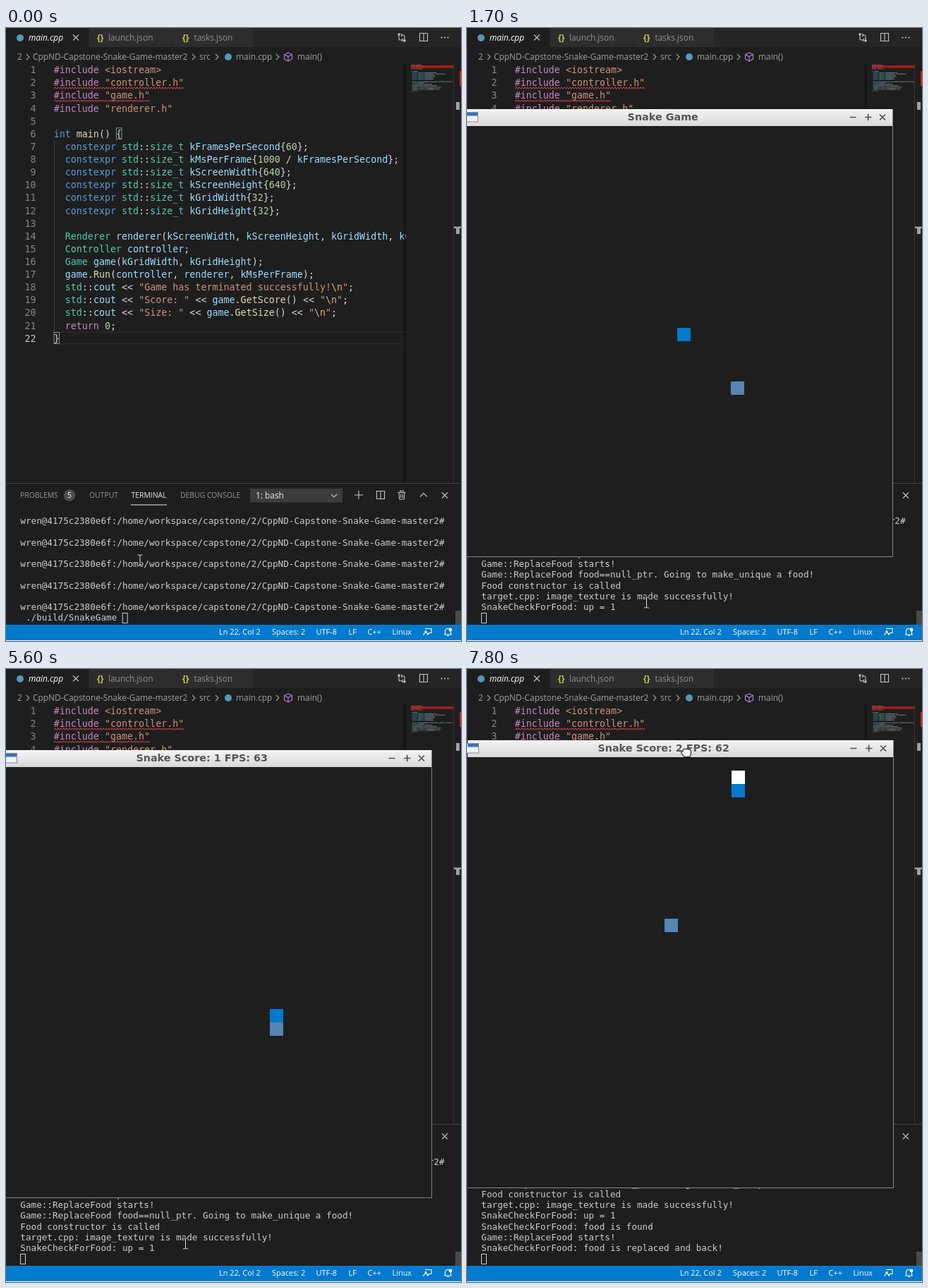
Animation, 645 px wide and 869 px high, one loop 8000 ms. Source, as an HTML page:

```html
<!DOCTYPE html>
<html lang="en">
<head>
<meta charset="utf-8">
<title>Snake in the editor</title>
<style>
  html, body { margin: 0; width: 100%; height: 100%; overflow: hidden; background: #1e1e1e; }
  svg { display: block; width: 645px; height: 869px; }
  text { white-space: pre; }
  .code { font: 13.33px "DejaVu Sans Mono", monospace; fill: #d4d4d4; }
  .term { font: 12.65px "DejaVu Sans Mono", monospace; fill: #cccccc; }
  .ui { font: 11.9px "Open Sans", "Noto Sans", sans-serif; fill: #a0a0a0; }
  .panel { font-size: 10.4px; fill: #979797; }
  .status { font-size: 10.95px; fill: #fff; }
  .title { font: bold 14.35px "DejaVu Sans", sans-serif; fill: #555; text-anchor: middle; }
  .line { fill: none; stroke: #c5c5c5; stroke-width: 1.1; }
</style>
</head>
<body>
<svg id="stage" viewBox="0 0 645 869" xmlns="http://www.w3.org/2000/svg"></svg>
<script>
const LOOP = 8000;
const svg = document.getElementById('stage');

const esc = s => s.replace(/&/g, '&amp;').replace(/</g, '&lt;').replace(/>/g, '&gt;');
const rect = (x, y, w, h, fill, more = '') =>
  `<rect x="${x}" y="${y}" width="${w}" height="${h}" fill="${fill}" ${more}/>`;
const text = (x, y, s, cls, more = '') =>
  `<text x="${x}" y="${y}" class="${cls}" ${more}>${esc(s)}</text>`;
const line = (d, more = '') => `<path class="line" d="${d}" ${more}/>`;
const dot = (x, y, r, fill) => `<circle cx="${x}" cy="${y}" r="${r}" fill="${fill}"/>`;
const cross = (x, y, r) =>
  line(`M${x - r} ${y - r}L${x + r} ${y + r}M${x + r} ${y - r}L${x - r} ${y + r}`);
const split = (x, y) => line(`M${x - 5.5} ${y - 5.5}h11v11h-11zM${x} ${y - 5.5}v11`);

// ---- editor ----
const source = String.raw`#include <iostream>
#include "controller.h"
#include "game.h"
#include "renderer.h"

int main() {
  constexpr std::size_t kFramesPerSecond{60};
  constexpr std::size_t kMsPerFrame{1000 / kFramesPerSecond};
  constexpr std::size_t kScreenWidth{640};
  constexpr std::size_t kScreenHeight{640};
  constexpr std::size_t kGridWidth{32};
  constexpr std::size_t kGridHeight{32};

  Renderer renderer(kScreenWidth, kScreenHeight, kGridWidth, kGridHeight);
  Controller controller;
  Game game(kGridWidth, kGridHeight);
  game.Run(controller, renderer, kMsPerFrame);
  std::cout << "Game has terminated successfully!\n";
  std::cout << "Score: " << game.GetScore() << "\n";
  std::cout << "Size: " << game.GetSize() << "\n";
  return 0;
}`.split('\n');

const rules = [
  [/^(#include|return\b)/, '#c586c0'],
  [/^("[^"]*"|<[a-z]+>)/, '#ce9178'],
  [/^(int|constexpr)\b/, '#569cd6'],
  [/^(std|size_t|Renderer|Controller|Game)\b/, '#4ec9b0'],
  [/^(main|Run|GetScore|GetSize)\b/, '#dcdcaa'],
  [/^\d+/, '#b5cea8'],
  [/^\w+/, '#9cdcfe'],
  [/^[^\w"#<]+|^<+/, '#d4d4d4']
];

function tokens(s) {
  const out = [];
  while (s) {
    const [re, color] = rules.find(r => r[0].test(s));
    const word = s.match(re)[0];
    s = s.slice(word.length);
    if (color === '#ce9178')
      word.split(/(\\n)/).filter(Boolean).forEach(p => out.push([p, p === '\\n' ? '#d7ba7d' : color]));
    else out.push([word, color]);
  }
  return out;
}

const lineY = i => 64.2 + i * 18.12;

function squiggle(row, width) {
  let d = `M68 ${lineY(row) + 4}`;
  for (let x = 0; x < width; x += 4) d += 'l2 -2.4l2 2.4';
  return `<path d="${d}" fill="none" stroke="#e04848" stroke-width="1"/>`;
}

function editor() {
  let nums = '', code = '', map = '';
  source.forEach((s, i) => {
    nums += text(42.5, lineY(i), String(i + 1), 'code',
      `text-anchor="end" style="fill:${i === 21 ? '#c6c6c6' : '#858585'}"`);
    let col = 0, spans = '';
    for (const [word, color] of tokens(s)) {
      spans += `<tspan fill="${color}">${esc(word)}</tspan>`;
      if (word.trim()) map += rect(574 + col * 0.8, 52 + i * 1.82, word.trim().length * 0.8, 1, color, 'opacity=".5"');
      col += word.length;
    }
    code += `<text class="code" x="67.7" y="${lineY(i)}">${spans}</text>`;
  });
  const brace = (x, i) =>
    rect(x, lineY(i) - 13.2, 7.5, 16, '#1b251b', 'stroke="#888" stroke-width="1"');
  return `<g clip-path="url(#codeClip)">
    ${rect(68, 430.5, 499, 1.5, '#282828')}${rect(68, 447, 499, 1.5, '#282828')}
    ${rect(68, 159, 1, 272, '#404040')}
    ${brace(156.5, 5)}${brace(68, 21)}${nums}${code}${squiggle(1, 184)}${squiggle(2, 136)}</g>
    ${rect(561, 50, 6, 595, 'url(#shade)')}
    <g clip-path="url(#mapClip)">${map}${rect(574, 53, 60, 3.8, '#d01818', 'opacity=".75"')}</g>
    ${rect(634, 50, 1, 595, '#363636')}${rect(643, 61, 2, 21, '#d02020')}
    ${rect(638, 105, 5, 11, '#a0a0a0')}${rect(635, 281.5, 10, 2.5, '#a0a0a0')}${rect(638, 283, 5, 9, '#a0a0a0')}`;
}

function header() {
  const chev = x => line(`M${x - 2} 37l4 4l-4 4`, 'style="stroke:#a0a0a0"');
  const braces = x => text(x, 17.5, '{}', 'ui', 'style="fill:#cbcb41;font-weight:bold"');
  return rect(0, 0, 645, 27, '#252526') + rect(0, 0, 117, 27, '#1e1e1e') +
    rect(118, 0, 118, 27, '#2d2d2d') + rect(237, 0, 113, 27, '#2d2d2d') +
    dot(20, 14, 5, '#519aba') +
    text(32, 18, 'main.cpp', 'ui', 'style="fill:#fff;font-style:italic"') + cross(99, 13.5, 4) +
    braces(129) + text(145, 18, 'launch.json', 'ui', 'style="fill:#929292"') +
    braces(250) + text(266.5, 18, 'tasks.json', 'ui', 'style="fill:#929292"') +
    line('M557 9v6q0 2 2 2h2M563 15l-2 2l2 2M565 18v-6q0 -2 -2 -2h-2M560 8l2 2l-2 2') +
    dot(557, 9, 1.7, '#c5c5c5') + dot(565, 18, 1.7, '#c5c5c5') + split(592, 13) +
    [617.5, 622, 626.5].map(x => dot(x, 13.5, 1.1, '#c5c5c5')).join('') +
    text(16, 45, '2', 'ui') + chev(31) + text(38, 45, 'CppND-Capstone-Snake-Game-master2', 'ui') +
    chev(266) + text(274, 45, 'src', 'ui') + chev(299) + dot(315, 41, 5, '#519aba') +
    text(326, 45, 'main.cpp', 'ui') + chev(385) +
    line('M400 35l5.5 2.5v6.5l-5.5 3l-5.5 -3v-6.5zM394.5 37.5l5.5 3l5.5 -3M400 40.5v6.5', 'style="stroke:#b180d7"') +
    text(413, 45, 'main()', 'ui');
}

function panelTop() {
  const tab = (x, s, more) => text(x, 666, s, 'ui panel', more);
  return rect(0, 645, 645, 1, '#434343') +
    tab(20, 'PROBLEMS') + dot(90, 662.5, 8.2, '#4d4d4d') +
    text(90, 666.3, '5', 'ui', 'style="fill:#fff;font-size:10.4px;text-anchor:middle"') +
    tab(118, 'OUTPUT') + tab(177.5, 'TERMINAL', 'style="fill:#e7e7e7"') +
    rect(177, 675.5, 51, 1, '#e7e7e7') + tab(247, 'DEBUG CONSOLE') +
    rect(346, 653, 131, 19.5, '#3c3c3c') +
    '<text id="shell" class="ui" x="354" y="667" style="fill:#f0f0f0"></text>' +
    line('M461 661l4 4l4 -4') + line('M494 662h12M500 656v12') + split(531, 662) +
    line('M555.5 658.5h11M559 658v-2h4v2M557 659l.7 9h6.6l.7 -9M559.7 660.5v5.5M562.3 660.5v5.5') +
    line('M587 664.5l5 -5l5 5') + cross(622, 662.5, 4);
}

function statusBar() {
  const items = [[302, 'Ln 22, Col 2'], [377, 'Spaces: 2'], [439.5, 'UTF-8'], [485.5, 'LF'], [512.5, 'C++'], [547.5, 'Linux']];
  const white = 'style="stroke:#fff"';
  return rect(0, 846, 645, 22, '#007acc') + rect(0, 868, 645, 1, '#fff') +
    items.map(([x, s]) => text(x, 860, s, 'ui status')).join('') +
    line('M594 851.5h9v6h-3l-2 2v-2M592 861q0 -3.5 3 -3.5t3 3.5', white) + dot(595, 855.5, 1.6, '#fff') +
    line('M621 860h11M622.5 859.5v-4q0 -4 4 -4t4 4v4M625 861.5h3', white) + dot(630, 853, 2.4, '#fff');
}

const frame = `
  ${rect(0, 115, 604, 635, '#858585')}${rect(0, 139, 603, 610, '#1e1e1e')}
  ${rect(0, 115, 603, 24, 'url(#bar)')}${rect(0, 115, 603, 1, '#fafafa')}
  ${rect(-2, 119.5, 17.5, 13.5, '#eef1f6', 'stroke="#8a8f96" stroke-width="1"')}${rect(0, 120, 15, 4.5, '#3b6fb5')}
  <text id="caption" class="title" x="277.7" y="131.3"></text>
  <path d="M542.5 126.5h9M564 126.5h9.5M568.7 121.8v9.5M585 122.5l8 8M593 122.5l-8 8"
    stroke="#505050" stroke-width="1.7" fill="none"/>
  <g id="board"></g>`;

const pointers = {
  beam: '<path d="M-3.5 -7.5h2.5l1 1l1 -1h2.5M0 -6.5v13M-3.5 7.5h2.5l1 -1l1 1h2.5" fill="none" stroke="#111" stroke-width="2.4"/>' +
    '<path d="M-3.5 -7.5h2.5l1 1l1 -1h2.5M0 -6.5v13M-3.5 7.5h2.5l1 -1l1 1h2.5" fill="none" stroke="#eee" stroke-width="1"/>',
  arrow: '<path d="M0 0v15l3.5 -3.3l2.4 5.3l2.4 -1.1l-2.4 -5h4.8z" fill="#fff" stroke="#111" stroke-width="1"/>',
  hand: '<path d="M-5 -3.5q1.2 -2.5 3 -1.2q1.5 -1.6 3 0q1.6 -1.2 2.8 .5q2.6 -.6 2.7 2v3.7l-1.5 4.5h-8l-4 -5q-.8 -2.5 2 -2.5z" fill="#fff" stroke="#222" stroke-width="1.2"/>'
};

svg.innerHTML = `<defs>
  <clipPath id="codeClip"><rect x="0" y="50" width="567" height="595"/></clipPath>
  <clipPath id="mapClip"><rect x="567" y="50" width="67" height="595"/></clipPath>
  <clipPath id="termClip"><rect x="0" y="690" width="645" height="156"/></clipPath>
  <linearGradient id="shade"><stop offset="0" stop-color="#000" stop-opacity="0"/><stop offset="1" stop-color="#000" stop-opacity=".4"/></linearGradient>
  <linearGradient id="bar" x2="0" y2="1"><stop offset="0" stop-color="#f4f4f4"/><stop offset="1" stop-color="#d9d9d9"/></linearGradient>
  </defs>
  ${rect(0, 0, 645, 869, '#1e1e1e')}${editor()}${header()}${panelTop()}
  <g id="term" clip-path="url(#termClip)"></g>
  ${rect(637, 826, 8, 20, '#4a4a4a')}${rect(0, 27, 1, 819, '#292929')}${statusBar()}
  <g id="game">${frame}</g><g id="pointer"></g>`;

const el = id => document.getElementById(id);
const [shell, caption, board, term, game, pointer] =
  ['shell', 'caption', 'board', 'term', 'game', 'pointer'].map(el);

// ---- timeline: each entry holds until the next one ----
const at = (steps, t) => steps.filter(s => s[0] <= t).pop();

const prompt = 'wren@4175c2380e6f:/home/workspace/capstone/2/CppND-Capstone-Snake-Game-master2#';
const idle = Array(5).fill(['', prompt]).flat();
const command = ' ./build/SnakeGame ';
const started = [...idle, command];
const running = [...started, 'Game constructor starts', 'Game constructor: prints done',
  'Game::ReplaceFood starts!', 'Game::ReplaceFood food==null_ptr. Going to make_unique a food!',
  'Food constructor is called', 'target.cpp: image_texture is made successfully!', 'SnakeCheckForFood: up = 1'];
const eaten = [...running, 'SnakeCheckForFood: food is found', 'Game::ReplaceFood starts!',
  'SnakeCheckForFood: food is replaced and back!'];

// time, finished lines, current line, cursor filled
const logs = [[0, idle, command, false], [600, idle, command, true], [1600, started, '', true],
  [1700, running, '', false], [6100, eaten, '', false]];

// time, head column, head row, length
const snake = [[1700, 16, 15, 1], [1900, 16, 14, 1], [2000, 16, 13, 1], [2200, 16, 12, 1], [2300, 16, 11, 1],
  [4200, 21, 10, 1], [4400, 20, 11, 1], [4700, 20, 12, 1], [4800, 20, 13, 1], [5000, 20, 14, 1],
  [5100, 20, 15, 1], [5300, 20, 16, 1], [5500, 20, 17, 1], [5600, 20, 18, 1], [6100, 20, 19, 1],
  [6200, 20, 21, 2], [6300, 20, 22, 2], [6400, 20, 24, 2], [6600, 20, 25, 2], [6800, 20, 27, 2],
  [7200, 20, 30, 2], [7500, 20, 31, 2], [7600, 20, 1, 2], [7800, 20, 2, 2]];

const captions = [[0, 'Snake Game'], [4200, 'Snake Score: 1 FPS: 63'], [6800, 'Snake Score: 2 FPS: 62']];

const mouse = [[0, 190, 754.5, 'beam'], [100, 208, 767, 'beam'], [200, 231, 782, 'beam'], [300, 247.5, 791.5, 'beam'],
  [500, 249, 795, 'beam'], [600, 251, 802, 'beam'], [700, 253.5, 810, 'beam'], [800, 254.5, 814.5, 'beam'],
  [6800, 257, 420, 'arrow'], [7200, 306, 165, 'arrow'], [7500, 306, 142, 'arrow'], [7600, 306, 131, 'arrow'],
  [7800, 311, 118.5, 'hand']];

const CELL = 610 / 32;
const cellX = c => Math.round(-7 + c * CELL);
const cellY = r => Math.round(139 + r * CELL);
const cell = (c, r, fill) =>
  rect(cellX(c), cellY(r), cellX(c + 1) - cellX(c), cellY(r + 1) - cellY(r), fill);

function drawTerm(t) {
  const [, done, current, filled] = at(logs, t);
  const rowY = i => 703 + i * 15.25;
  const x = 20.3 + current.length * 7.615;
  term.innerHTML = [...done.slice(-9), current].map((s, i) => text(20.3, rowY(i), s, 'term')).join('') +
    (filled ? rect(x, 829, 7.6, 15, '#cccccc')
      : rect(x + .2, 829.5, 7, 14, 'none', 'stroke="#cccccc" stroke-width="1"'));
}

function drawGame(t) {
  game.style.display = t < 1700 ? 'none' : '';
  if (t < 1700) return;
  game.setAttribute('transform', t < 7800 ? '' : 'translate(1 -14)');
  caption.textContent = at(captions, t)[1];
  const [, col, row, size] = at(snake, t);
  const food = t < 6100 ? [20, 19] : [15, 12];
  board.innerHTML = cell(...food, '#5585b3') +
    (size > 1 ? cell(col, (row + 31) % 32, '#fff') : '') + cell(col, row, '#007acc');
}

function draw(t) {
  shell.textContent = t < 1600 ? '1: bash' : '1: SnakeGame';
  drawTerm(t);
  drawGame(t);
  const [, x, y, kind] = at(mouse, t);
  pointer.setAttribute('transform', `translate(${x} ${y})`);
  pointer.innerHTML = pointers[kind];
}

function tick() {
  draw(performance.now() % LOOP);
  requestAnimationFrame(tick);
}
draw(0);
tick();
</script>
</body>
</html>
```
